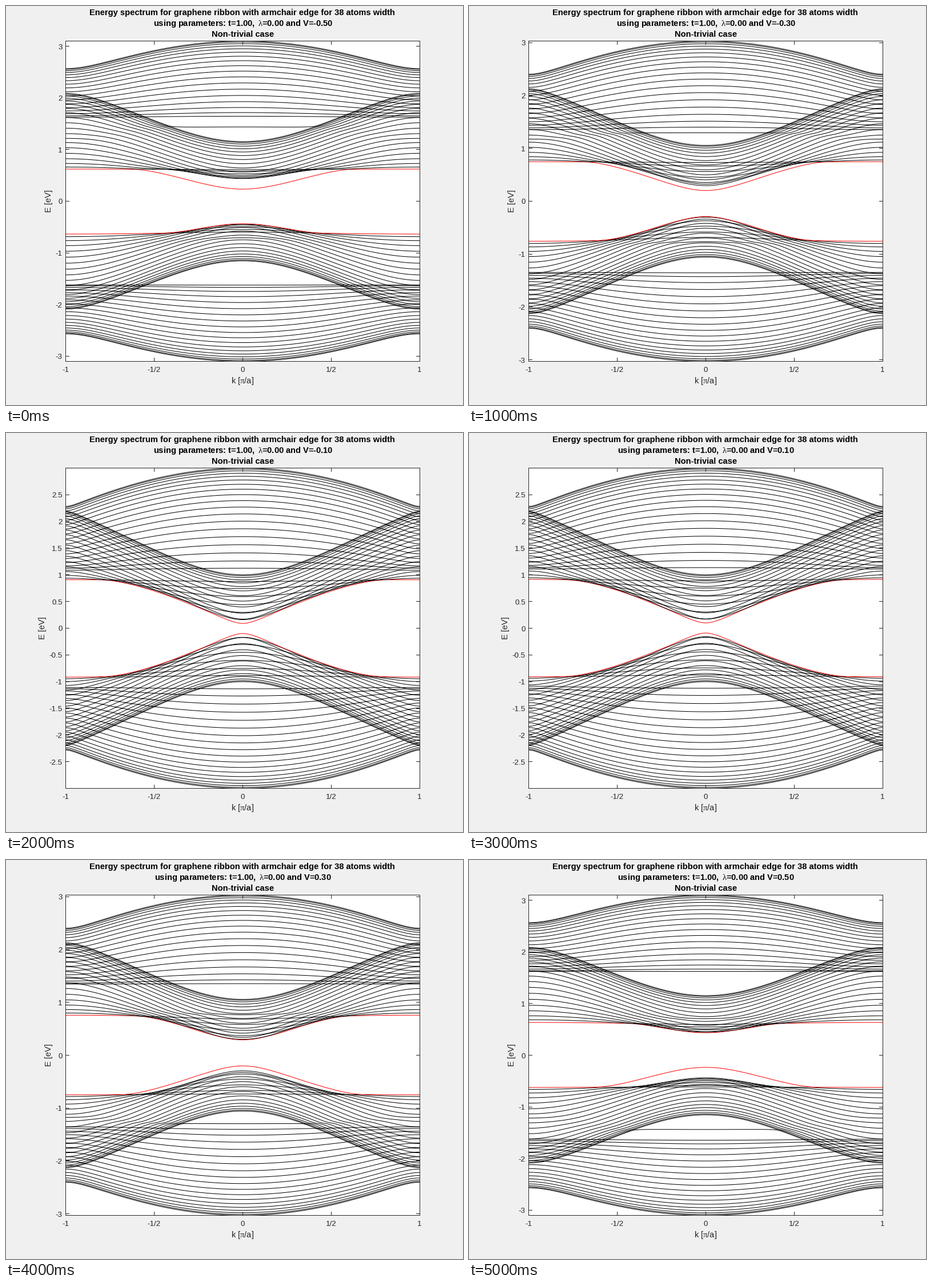
Recreate the animation shown at these times as a matplotlib script. Size 800 px wide and 700 px high, loop 5.5 s.

```python
import numpy as np
import matplotlib.pyplot as plt
from matplotlib.animation import FuncAnimation
from matplotlib.collections import LineCollection

plt.rcParams.update({
    "font.family": "Liberation Sans",
    "mathtext.fontset": "custom",
    "mathtext.rm": "Liberation Serif",
    "path.snap": False,        # coordinates below already sit on pixel centres
})

PX = 0.72                      # points per pixel at 100 dpi
LEFT, RIGHT, TOP, BOTTOM = 104.5, 724.5, 61.5, 623.5
MID = (LEFT + RIGHT) / 2
GREY = "#262626"
TICK = 6.5
ROWS = 38
STEPS = 11
HALF_K = np.linspace(0, 1, 101)


def hopping():
    """Armchair ribbon: bonds inside one cell and bonds to the next cell."""
    inner = np.zeros((2 * ROWS, 2 * ROWS))
    outer = np.zeros_like(inner)
    for j in range(ROWS):
        a, b = 2 * j, 2 * j + 1
        inner[a, b] = 1
        if j % 2 == 0:
            for n in (j - 1, j + 1):
                if 0 <= n < ROWS:
                    inner[b, 2 * n] = 1
                    outer[a, 2 * n + 1] = 1
    return inner, outer


def potential(v):
    """Sublattice term plus row-alternating term, bare last row."""
    diag = np.tile([2 * v, 0, 0, -2 * v], ROWS // 2)
    diag[-1] = 0
    return np.diag(diag)


def bands(v):
    inner, outer = hopping()
    phase = np.exp(1j * np.pi * HALF_K)[:, None, None]
    upper = inner + phase * outer
    ham = upper + upper.conj().transpose(0, 2, 1) + potential(v)
    half = np.linalg.eigvalsh(ham)
    return np.vstack([half[:0:-1], half])


volts = [(i - STEPS // 2) / 10 for i in range(STEPS)]
spectra = [bands(v) for v in volts]
xs = np.linspace(LEFT, RIGHT, 2 * len(HALF_K) - 1)

fig = plt.figure(figsize=(8, 7), dpi=100, facecolor="#f0f0f0")
ax = fig.add_axes([0, 0, 1, 1])
ax.set_xlim(0, 800)
ax.set_ylim(700, 0)
ax.axis("off")


def label(x, y, text, size=14.667, color=GREY, ha="center", **kw):
    return ax.text(x, y, text, fontsize=size * PX, color=color,
                   ha=ha, va="baseline", **kw)


def box(**kw):
    ax.add_patch(plt.Rectangle((LEFT, TOP), RIGHT - LEFT, BOTTOM - TOP, **kw))


box(fc="white", ec="none", zorder=0)
box(fc="none", ec=GREY, lw=PX, zorder=4)
colors = ["red" if n in (ROWS - 1, ROWS) else "black" for n in range(2 * ROWS)]
curves = LineCollection([], colors=colors, linewidths=PX, zorder=2)
y_ticks = LineCollection([], colors=GREY, linewidths=PX, zorder=3)
ax.add_collection(curves, autolim=False)
ax.add_collection(y_ticks, autolim=False)

x_marks = []
for n, name in enumerate(["-1", "-1/2", "0", "1/2", "1"]):
    x = LEFT + (RIGHT - LEFT) * n / 4
    x_marks += [[(x, BOTTOM), (x, BOTTOM - TICK)], [(x, TOP), (x, TOP + TICK)]]
    label(x - 0.5, 642, name, 13.333)
ax.add_collection(LineCollection(x_marks, colors=GREY, linewidths=PX, zorder=3),
                  autolim=False)

bold = dict(color="black", weight="bold")
label(MID - 1, 16, "Energy spectrum for graphene ribbon with armchair edge "
      "for 38 atoms width", **bold)
params = label(MID + 0.5, 35, "", **bold)
label(MID + 0.5, 54, "Non-trivial case", **bold)
label(MID - 0.5, 662, r"k [$\mathrm{\pi}$/a]")
y_name = label(79, 342, "E [eV]", rotation=90, rotation_mode="anchor")
y_labels = [label(98.7, 0, "", 13.333, ha="right") for _ in range(13)]


def draw(i):
    energy = spectra[i]
    low, high = energy.min(), energy.max()

    def to_y(e):
        return TOP + (high - e) / (high - low) * (BOTTOM - TOP)

    curves.set_segments([np.column_stack([xs, to_y(e)]) for e in energy.T])

    step = 0.5 if high < 3 else 1
    count = int(min(high, -low) / step)
    ticks = [n * step for n in range(-count, count + 1)]
    marks = []
    for text in y_labels:
        text.set_text("")
    for text, e in zip(y_labels, ticks):
        y = to_y(e)
        row = np.floor(y) + 0.5
        marks += [[(LEFT, row), (LEFT + TICK, row)],
                  [(RIGHT, row), (RIGHT - TICK, row)]]
        text.set_text(f"{e:g}")
        text.set_y(y + 5)
    y_ticks.set_segments(marks)
    y_name.set_x(68 if step < 1 else 79)

    params.set_text(r"using parameters: t=1.00, $\,\mathrm{\lambda}$=0.00 and "
                    f"V={volts[i]:.2f}")
    return [curves, y_ticks, y_name, params, *y_labels]


anim = FuncAnimation(fig, draw, frames=STEPS, interval=500,
                     repeat=True, repeat_delay=0, blit=False)
plt.show()
```
